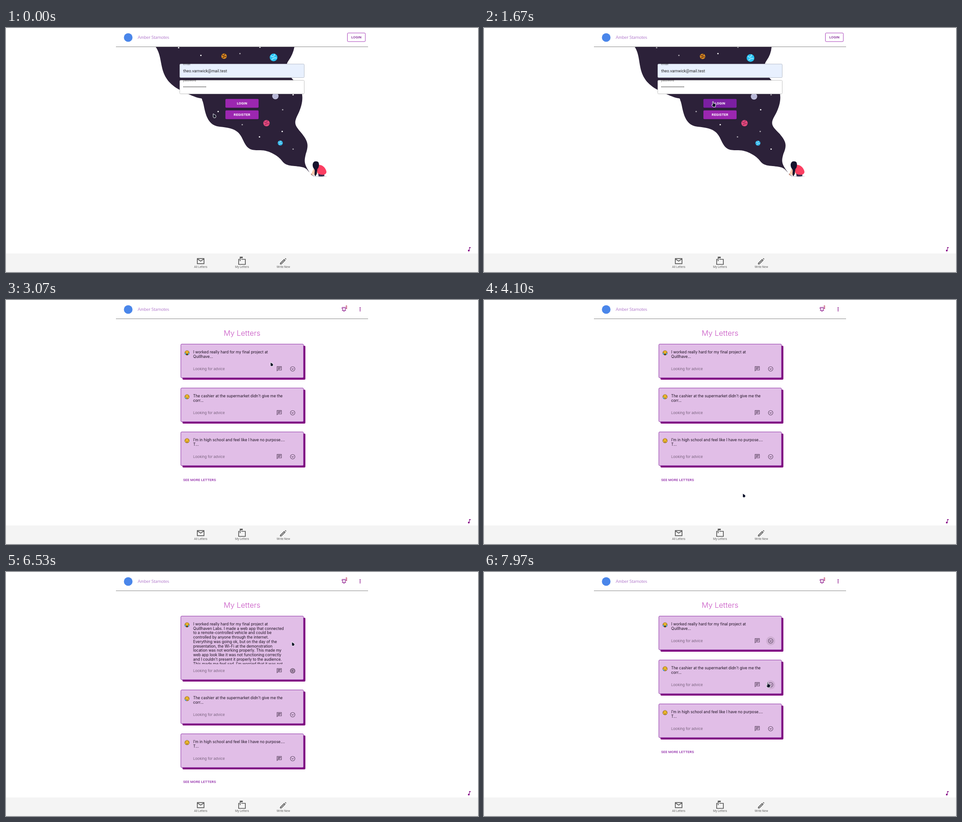
Recreate the animation shown at these times as an HTML page. Size 1039 by 539 pixels, loop 8000 ms.

```html
<!DOCTYPE html>
<html lang="en">
<head>
<meta charset="utf-8">
<title>Letters</title>
<style>
html, body { margin: 0; width: 100%; height: 100%; overflow: hidden; background: #fff; }
svg { display: block; width: 1039px; height: 539px; }
text { white-space: pre; }
.field { font: 400 8.66px Roboto, Arial, sans-serif; letter-spacing: .08px; fill: #222; }
.btn { font: 500 7.57px Roboto, Arial, sans-serif; letter-spacing: .2px; }
.body { font: 400 8.4px Inter, "Open Sans", sans-serif; fill: #1c1020; }
.soft { font: 300 8.1px Inter, "Open Sans", sans-serif; fill: #5d4a62; }
.tab { font: 400 6.5px Roboto, Arial, sans-serif; fill: #666; text-anchor: middle; }
.hint { font: 400 6.5px Roboto, Arial, sans-serif; fill: rgba(0,0,0,.56); }
.mid { text-anchor: middle; }
.icon { fill: none; stroke-width: 2; }
</style>
</head>
<body>
<svg viewBox="0 0 1039 539">
  <defs>
    <clipPath id="under"><rect x="242" y="42" width="555" height="456"/></clipPath>
    <clipPath id="fold"><rect id="foldBox" x="400" y="104" width="250" height="33"/></clipPath>
    <linearGradient id="bar" x2="0" y2="1"><stop offset="0" stop-color="#3f3a3d"/><stop offset="1" stop-color="#575055"/></linearGradient>
  </defs>
  <g id="page">
    <circle cx="269" cy="21" r="9.5" fill="#4a86ea"/>
    <text x="290" y="24" font-family="Lato, sans-serif" font-weight="300" font-size="9.6" fill="#7d1fa8">Amber Starnotes</text>
    <rect x="242" y="41" width="555" height="1" fill="#8a8a8a"/>

    <g id="login">
      <rect x="751.5" y="11" width="39.5" height="19" rx="2" fill="#fff" stroke="#9c27b0" stroke-width=".9"/>
      <text class="btn mid" x="771.3" y="23" fill="#7f2093">LOGIN</text>
      <g clip-path="url(#under)">
        <path id="space" fill="#2c2139"/>
        <g id="stars" fill="#fff"></g>
        <g id="planets"></g>
      </g>
      <g id="girl">
        <ellipse cx="691" cy="328" rx="16" ry="1" fill="#dcdce4"/>
        <path d="M669 319l9-6 4 13-8 1z" fill="#fff"/>
        <path d="M687 320q7-4 13 1l1 6q-6 1.500-13 .6z" fill="#3b2a4a"/>
        <path d="M683 305q5-5 13-1 8 5 9.500 14-.5 5-6 6-8 1-13-3-4-4-3.500-16z" fill="#fb3f62"/>
        <path d="M677 311l7 1 2 9-9 5-1-4-3 4-2-1z" fill="#ffc9ac"/>
        <path d="M671 322l6 5" stroke="#55364a"/>
        <path d="M675 302q1-8 7-7.500 7-.5 7 7 0 7-3.500 10-1 7-1.500 11-2 4-3.500 5-2-4-1-10 .5-5-2-7-2.500-3-2.500-7.500z" fill="#15122c"/>
      </g>
      <g stroke-width=".9">
        <rect x="382.5" y="79.6" width="274" height="30" rx="2" fill="#e8f0fe" stroke="#b3b9c6"/>
        <rect x="382.5" y="115.5" width="274" height="30" rx="2" fill="#fff" stroke="#bdbdbd"/>
      </g>
      <text class="hint" x="390" y="82">email</text>
      <text class="hint" x="390" y="117.7">password</text>
      <text class="field" x="390" y="98">theo.varnwick@mail.test</text>
      <text class="field" x="390" y="133" id="dots"></text>
      <g id="buttons"></g>
    </g>

    <g id="inbox">
      <g id="top"></g>
      <text id="badge" x="746.6" y="19.6" font-family="Roboto, sans-serif" font-size="11"></text>
      <text class="mid" x="519.7" y="79" font-family="Inter, sans-serif" font-weight="300" font-size="16.4" fill="#c855c4">My Letters</text>
      <g id="letters"></g>
    </g>
  </g>

  <rect y="498" width="1039" height="41" fill="#f4f4f4"/>
  <g id="tabs"></g>
  <g id="status">
    <rect y="527.5" width="345" height="11.5" fill="url(#bar)"/>
    <text x="2.5" y="536" font-family="'Open Sans', sans-serif" font-size="6.3" fill="#e6e2e4">Connecting...</text>
  </g>
  <g id="cursor" fill="#0b1028" stroke="#fff" stroke-linejoin="round">
    <path id="arrow" d="M0-.5L5.700 3 6.300 5.600 5 8.300H1.200L0 6.500z"/>
    <path id="hand" d="M-.7.8Q.3-.7 1.300.8V4.200L5 5Q6.500 5.500 6.300 7.500L5.300 12.500H.5L-2.800 8.200Q-2.600 6.800-.7 7.800z"/>
  </g>
</svg>
<script>
const $ = id => document.getElementById(id);
const LOOP = 8000;
const clamp = v => Math.max(0, Math.min(1, v));
const ramp = (t, from, span) => clamp((t - from) / span);
const easeOut = p => 1 - (1 - p) ** 3;
const inside = (t, a, b) => t >= a && t < b;
const show = (id, on) => { $(id).style.display = on ? '' : 'none'; };
const move = (id, x, y) => $(id).setAttribute('transform', `translate(${x} ${y})`);
const set = (id, attrs) => Object.entries(attrs).forEach(([k, v]) => $(id).setAttribute(k, v));

// Line icons on a 24-unit grid
const icons = {
  mail: 'M3 5h18v14H3zM3 6l9 6 9-6',
  box: 'M10 7h11v14H3V7h2M7 12V1h6v2H7',
  pen: 'M4 20v-2.300L14.200 7.500l2.300 2.300L6.300 20zM17 4.500l2.500 2.500',
  note: 'M13 17V4h4v2h-4M13 17a2.500 2.500 0 1 0-5 0 2.500 2.500 0 1 0 5 0M9 17h3',
  bell: 'M7 17V11a5 5.500 0 0 1 10 0v6M4 18h16M10 21h4M12 3v3M3 10.500q.3-4 4-7M21 10.500q-.3-4-4-7',
  chat: 'M3 3h18v14H6l-3 3zM6 7h12M6 10h12M6 13h8'
};
const icon = (name, x, y, scale, color) =>
  `<path class="icon" d="${icons[name]}" transform="translate(${x} ${y}) scale(${scale}) translate(-12 -12)" stroke="${color}"/>`;
const SMALL = .541;

$('dots').textContent = '•'.repeat(17);
$('top').innerHTML = icon('bell', 744, 20, SMALL, '#800080') +
  [-1, 0, 1].map(k => `<circle cx="779.5" cy="${20.5 + k * 3.3}" r="1.15" fill="#800080"/>`).join('');
$('tabs').innerHTML = ['mail', 'box', 'pen'].map((name, i) => {
  const x = 428.5 + i * 91;
  return icon(name, x, 515, .812, '#555') +
    `<text class="tab" x="${x}" y="530">${['All Letters', 'My Letters', 'Write New'][i]}</text>`;
}).join('') + icon('note', 1019.5, 489, SMALL, '#800080');
$('buttons').innerHTML = ['LOGIN', 'REGISTER'].map((label, i) => {
  const y = 156.8 + i * 25.2;
  return `<rect x="483" y="${y + 1.2}" width="73" height="19.5" rx="2" opacity=".28"/>
    <rect id="btn${i}" x="483" y="${y}" width="73" height="19.5" rx="2" fill="#9c27b0"/>
    <text class="btn mid" style="font-weight:700" x="519.6" y="${y + 12.1}" fill="#fff">${label}</text>`;
}).join('');

const full = ['I worked really hard for my final project at',
  'Quillhaven Labs. I made a web app that connected',
  'to a remote-controlled vehicle and could be',
  'controlled by anyone through the internet.',
  'Everything was going ok, but on the day of the',
  'presentation, the Wi-Fi at the demonstration',
  'location was not working properly. This made my',
  'web app look like it was not functioning correctly',
  "and I couldn't present it properly to the audience.",
  "This made me feel sad. I'm worried that it was not",
  'good enough.'];
const briefs = [[full[0], 'Quillhave...'],
  ["The cashier at the supermarket didn't give me the", 'corr...'],
  ['I’m in high school and feel like I have no purpose....', 'T...']];
const moods = ['<path d="M395 117v4M402 117v4" stroke="#2f9fe0" stroke-width="2"/><circle cx="398.5" cy="120" r="1.6" fill="#5a2a18"/>',
  '<path d="M396 120q2.500-2 5 0"/><circle cx="395.6" cy="119.8" r="1.6" fill="#2f9fe0" stroke="none"/>',
  '<path d="M396 120q2.500-2 5 0"/>'];
const lines = rows => rows.map((s, i) => `<text class="body" x="412" y="${117.8 + i * 9.75}">${s}</text>`).join('');
const card = i => `<g id="card${i}">
  <rect id="shade${i}" x="388.5" y="101" width="270.5" height="75" rx="2" fill="#800080"/>
  <rect id="face${i}" x="384.9" y="97.4" width="270" height="74.5" rx="2" fill="#e1bee7" stroke="#8522a0" stroke-width=".9"/>
  <circle cx="398.5" cy="116.8" r="5" fill="#f9c22e" stroke="#5c4420" stroke-width=".7"/>
  <g fill="none" stroke="#4a2c14" stroke-width=".9"><path d="M395 116l2.200-1M402 116l-2.200-1"/>${moods[i]}</g>
  <g id="brief${i}">${lines(briefs[i])}</g>
  ${i ? '' : `<g id="full" clip-path="url(#fold)">${lines(full)}</g>`}
  <g id="foot${i}">
    <text class="soft" x="412" y="155">Looking for advice</text>
    ${icon('chat', 601.5, 152, SMALL, '#604a66')}
    <circle id="glow${i}" cx="631" cy="152.2" r="10" opacity="0"/>
    <g id="chev${i}" fill="none" stroke="#604a66" stroke-width="1.1"><circle cx="631" cy="152.2" r="5"/><path d="M628.800 151.300l2.200 2.200 2.200-2.200"/></g>
  </g></g>`;
$('letters').innerHTML = [0, 1, 2].map(card).join('') +
  '<text id="more" class="btn" x="390" y="400" fill="#8e24a6">SEE MORE LETTERS</text>';

// The first half of the stars fades while the rest brightens
const stars = [[380, 43], [429, 60], [559, 42], [467, 184], [632, 147], [608, 228], [558, 240],
  [515, 56], [520, 213], [609, 180], [632, 267]];
$('stars').innerHTML = stars.map(([x, y], i) => `<circle id="star${i}" cx="${x}" cy="${y + .5}" r="1.5"/>`).join('');

const planets = [
  { x: 480, y: 62.3, r: 6, dx: 1.2, base: '#d88a22', tone: '#5c2c14' },
  { x: 589, y: 65, r: 8.5, dx: -2.5, base: '#28c4f4', tone: '#8fe6ff' },
  { x: 593, y: 150.5, r: 7, dx: 1.5, base: '#bdbdda', tone: '#b1b1d2' },
  { x: 573.4, y: 210.3, r: 7, dx: 0, base: '#e24b7d', tone: '#a82f62' },
  { x: 603.7, y: 254, r: 5.6, dx: -.8, base: '#2fb2e6', tone: '#8fe3fb' }];
$('planets').innerHTML = planets.map(({ r, base, tone }, i) => `<g id="planet${i}"><circle r="${r}" fill="${base}"/>
  <path transform="scale(${r})" d="M-.7-.5Q0 .3.3-.9M-.5.6Q.2-.1.8.2" fill="none" stroke="${tone}" stroke-width=".25"/></g>`).join('');

function drawSky(t) {
  const s = 1.04 * Math.sin(Math.PI / 2 * t / 1300);
  $('space').setAttribute('d', `M${329 + 2.5 * s} 41
    C${350 + s} 70 330 110 385 138S428 148 433 162 438 215 470 218 512 226 522 248 540 270 560 270
    600 283 608 294 628 304 645 306 662 313 ${668 + s} 319
    C${656 - s} 300 ${656 - 2 * s} 295 ${660 - s} 278C${667 + s} 258 664 250 ${652 - s} 234
    C${636 - 4 * s} 215 ${632 - 3 * s} 212 ${643 - s} 190C655 165 657 140 640 122
    C620 105 612 85 622 72Q632 58 ${635 - 2 * s} 41Z`);
  planets.forEach((p, i) => move('planet' + i, p.x + p.dx * s, p.y + Math.abs(p.dx) * s / 2));
  stars.forEach((_, i) => set('star' + i, { opacity: .8 + .2 * Math.cos(Math.PI * (s + (i > 6))) }));
}

// Pointer stops: time, x, y
const stops = [[0, 456, 190], [1070, 483, 169], [1700, 504, 162], [2900, 504, 162], [3070, 582, 138], [3700, 304, 118],
  [4180, 590, 452], [4360, 782, 300], [4700, 560, 50], [5130, 409, 342], [5400, 529, 346], [5870, 629, 155],
  [6530, 629, 155], [7050, 624, 243], [LOOP, 624, 243]];

function pointer(t) {
  const i = stops.findIndex(s => s[0] > t);
  const [t0, x0, y0] = stops[i - 1], [t1, x1, y1] = stops[i];
  const p = ramp(t, t0, t1 - t0), e = p * p * (3 - 2 * p);
  return [x0 + (x1 - x0) * e, y0 + (y1 - y0) * e];
}

const OPEN = 6455, CLOSE = 7715;

function drawInbox(t) {
  const grow = 88 * (easeOut(ramp(t, OPEN, 205)) - easeOut(ramp(t, CLOSE, 205)));
  const turn = 180 * (ramp(t, OPEN, 150) - ramp(t, CLOSE, 150));
  move('page', 0, -3 * (ramp(t, OPEN + 245, 150) - ramp(t, CLOSE, 100)));
  set('shade0', { height: 75 + grow });
  set('face0', { height: 74.5 + grow });
  set('foldBox', { height: 33.5 + grow });
  show('brief0', grow < .5);
  show('full', grow >= .5);
  move('foot0', 0, grow);
  move('card1', 0, 97 + grow);
  move('card2', 0, 194 + grow);
  move('more', 0, grow);
  set('chev0', { transform: `rotate(${turn} 631 152.2)` });

  const press = inside(t, OPEN, OPEN + 145);
  set('glow0', { r: press ? 3 + 7 * ramp(t, OPEN, 200) : 10, opacity: press ? .24 : t > OPEN ? .08 : t > 5790 ? .05 : 0 });
  set('glow1', { opacity: t > 7830 ? .08 : 0 });
}

function draw(t) {
  const home = t < 1800, loaded = t >= 2270;
  show('login', home);
  show('inbox', !home);
  show('letters', loaded);
  show('status', inside(t, 1830, 2390));
  $('badge').textContent = loaded ? '1' : '0';
  set('badge', { fill: loaded ? '#b3123c' : '#e0182d' });
  if (home) drawSky(t);
  drawInbox(t);

  const overLogin = inside(t, 1200, 1800);
  const hand = overLogin || inside(t, 5790, OPEN) || t > 6980;
  set('btn0', { fill: overLogin ? '#7b1fa2' : '#9c27b0' });
  show('hand', hand);
  show('arrow', !hand);
  move('cursor', ...pointer(t));
}

const start = performance.now();
function tick() {
  draw((performance.now() - start) % LOOP);
  requestAnimationFrame(tick);
}
tick();
</script>
</body>
</html>
```
